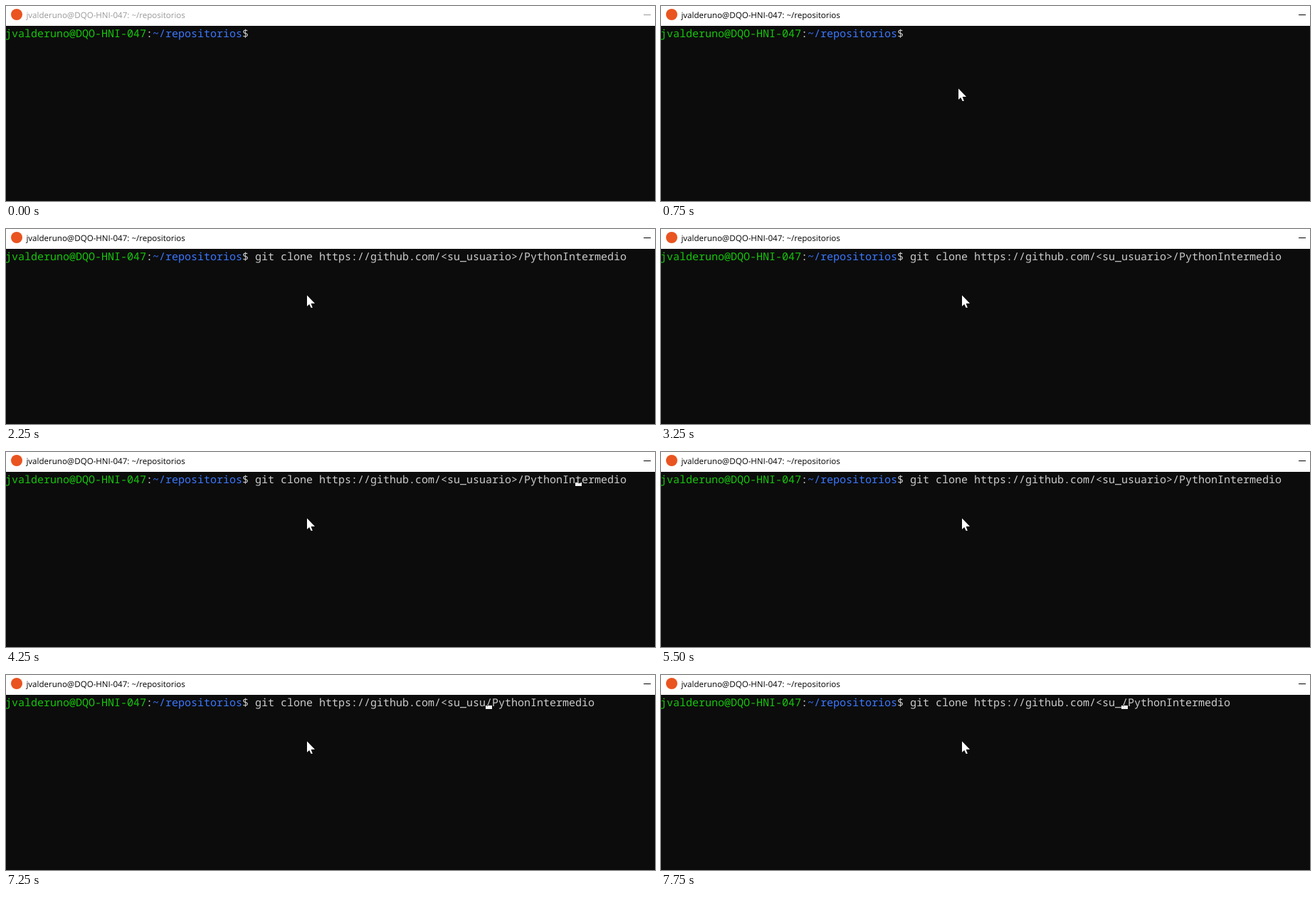
An HTML page that plays this animation: 912x275 px, repeating every 8000 ms.

```html
<!DOCTYPE html>
<html lang="es">
<head>
<meta charset="utf-8">
<title>Terminal</title>
<style>
  html, body { margin: 0; width: 100%; height: 100%; overflow: hidden; background: #0c0c0c; }
  svg { display: block; isolation: isolate; }
  text { white-space: pre; text-rendering: geometricPrecision; }
  #title { font: 11.55px "Open Sans", sans-serif; }
  #line { font: 15px "Noto Sans Mono", monospace; fill: #ccc; }
  #caret { fill: #fff; mix-blend-mode: difference; }
</style>
</head>
<body>
<svg width="912" height="275" viewBox="0 0 912 275">
  <rect width="912" height="275" fill="#0c0c0c"/>
  <rect width="912" height="28" fill="#fff"/>
  <circle cx="15" cy="12" r="8" fill="#e95420"/>
  <g id="bar">
    <text id="title" x="28.4" y="17">jvalderuno@DQO-HNI-047: ~/repositorios</text>
    <rect x="896" y="12" width="10" height="1"/>
  </g>
  <text id="line" x="-1" y="44"><tspan fill="#16c60c">jvalderuno@DQO-HNI-047</tspan>:<tspan fill="#3b78ff">~/repositorios</tspan>$ <tspan id="command"></tspan></text>
  <rect id="caret" y="43" width="9" height="5"/>
  <path id="mouse" d="M0 -.5V15L3.2 12L5.6 17H7.8L5.6 11H11Z" fill="#fff"/>
</svg>
<script>
const LOOP = 8000, TICK = 250, CELL = 9, PROMPT = 39;
const HEAD = 'git clone https://github.com/<su_usuario>';
const TAIL = '/PythonIntermedio';
const END = HEAD.length + TAIL.length;

// Moments in ms: window focus, caret shown, paste, left arrow held and released, erasing
const FOCUS = 750, READY = 1250, PASTE = 1500, LEFT = 3750, RELEASE = 4750, ERASE = 6750;
const REPEAT_DELAY = 280, REPEAT_RATE = 0.032, ERASE_RATE = 0.0066;

const $ = id => document.getElementById(id);
const clamp = (v, lo, hi) => Math.min(hi, Math.max(lo, v));
const mix = (a, b, p) => a + (b - a) * p;
const easeOut = p => 1 - (1 - p) ** 2;

function caretColumn(t) {
  if (t < PASTE) return 0;
  if (t < LEFT) return END;
  if (t < ERASE) {
    const repeats = Math.max(0, t - LEFT - REPEAT_DELAY) * REPEAT_RATE;
    return Math.max(HEAD.length, END - 1 - Math.floor(repeats));
  }
  return Math.round(HEAD.length - 1.6 - (t - ERASE) * ERASE_RATE);
}

// The caret stays lit while in use, then blinks every 500 ms.
function caretLit(t) {
  if (t < READY) return false;
  if (t >= ERASE) return true;
  const idle = t - (t < LEFT ? PASTE : RELEASE);
  return Math.floor((idle - 250) / 500) % 2 !== 1;
}

// The pointer comes in, jumps up, then glides to rest.
function pointer(t) {
  if (t < 250) return [-50, -50];
  if (t < 500) return [419, 149];
  const p = easeOut(clamp((t - FOCUS) / 500, 0, 1));
  return [mix(418, 423, p), mix(117, 94, p)].map(Math.round);
}

function draw(now) {
  const t = Math.floor(now % LOOP / TICK) * TICK;
  const col = caretColumn(t);
  const head = t < ERASE ? HEAD : HEAD.slice(0, col);
  $('command').textContent = t < PASTE ? '' : head + TAIL;
  $('caret').setAttribute('visibility', caretLit(t) ? 'visible' : 'hidden');
  $('caret').setAttribute('x', (PROMPT + col) * CELL - 1);
  $('mouse').setAttribute('transform', `translate(${pointer(t)})`);
  $('bar').setAttribute('fill', t < FOCUS ? '#999' : '#000');
  requestAnimationFrame(draw);
}
requestAnimationFrame(draw);
</script>
</body>
</html>
```
